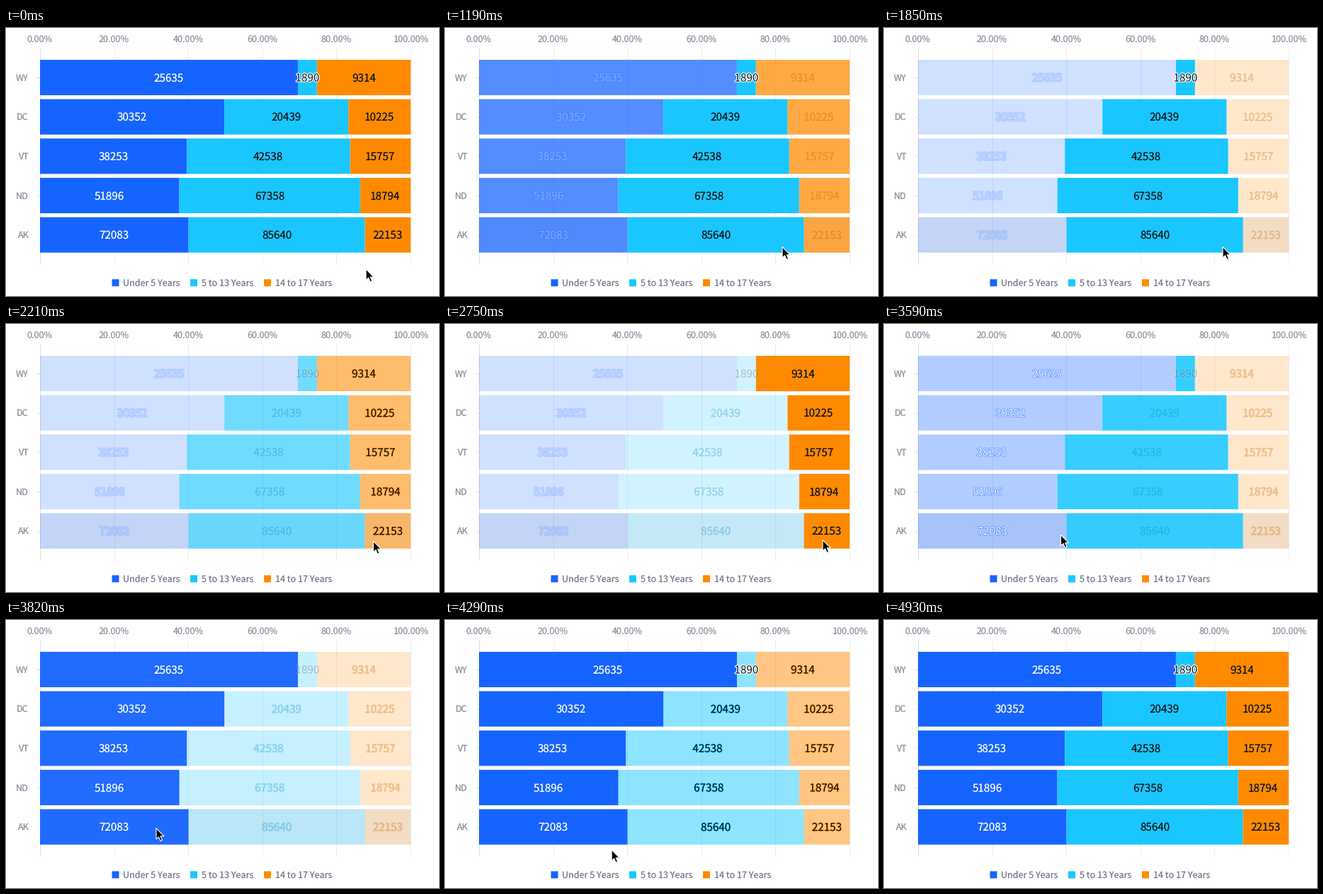
Animation, 611 px wide and 379 px high, one loop 5.59 s. Source, as a matplotlib script:

```python
import matplotlib.pyplot as plt
import numpy as np
from matplotlib.animation import FuncAnimation
from matplotlib.patches import Polygon, Rectangle
from matplotlib.patheffects import Normal, Stroke

W, H, DPI = 611, 379, 100
LOOP, INTERVAL = 5590, 26
PT = 72 / DPI  # points per pixel
plt.rcParams["font.family"] = "Noto Sans CJK JP"
plt.rcParams["text.hinting"] = "none"

SERIES = ["Under 5 Years", "5 to 13 Years", "14 to 17 Years"]
COLORS = ["#1664ff", "#1ac6ff", "#ff8a00"]
MUTED_INK = [(1, 1, 1), (.05, .39, .5), (.5, .27, 0)]
INK = ["#ffffff", "#0c1218", "#0c1218"]
DATA = {
    "WY": (25635, 1890, 9314),
    "DC": (30352, 20439, 10225),
    "VT": (38253, 42538, 15757),
    "ND": (51896, 67358, 18794),
    "AK": (72083, 85640, 22153),
}
LEFT, RIGHT, TOP, BOTTOM = 48, 571, 28.3, 334.3
STEP = (BOTTOM - TOP) / 5.5
BAR = 0.9 * STEP

# Screen-capture clock: (ms, tick) anchors
CLOCK_MS = [0, 660, 1190, 3350, 3820, 4000, 4520, 4930, 5590]
CLOCK_TICK = [0, 11, 20, 56, 64, 67, 76, 83, 94]

# (ms, hovered series)
HOVERS = [(1090, 1), (2070, 2), (2966, 1), (3538, 0), (4180, None)]
FADE, DIM = 300, 0.2
CURSOR_GONE = 4900
PATH = np.array([
    (0, 508, 341), (660, 508, 341), (900, 500, 333), (1090, 485, 318),
    (1190, 476, 309.5), (1250, 478, 309.5), (1850, 478, 309.5),
    (2070, 507, 308.5), (2390, 533, 305.5), (2750, 533, 305.5),
    (2966, 507, 305), (3170, 393, 301), (3538, 257, 299), (3820, 212, 294.5),
    (3880, 211, 294.5), (4000, 211, 294.5), (4180, 222, 318),
    (4520, 263, 340), (4640, 360, 352), (4870, 584, 375),
])
ARROW = np.array([(0, 0), (0, 15.4), (3.5, 12.2), (6, 18),
                  (8.5, 16.9), (6.1, 11.2), (10.9, 11.2)])

fig = plt.figure(figsize=(W / DPI, H / DPI), dpi=DPI, facecolor="white")
ax = fig.add_axes([0, 0, 1, 1])
ax.set_xlim(0, W)
ax.set_ylim(H, 0)
ax.axis("off")


def line(x0, y0, x1, y1, color):
    ax.plot([x0, x1], [y0, y1], color=color, lw=PT, zorder=0,
            solid_capstyle="butt")


def rect(x, y, w, h, color, z=2, **kw):
    return ax.add_patch(Rectangle((x, y), w, h, fc=color, lw=0, zorder=z,
                                  snap=False, **kw))


def text(x, yc, s, size, color, ha="center", z=4):
    return ax.text(x, yc + 0.366 * size, s, fontsize=size * PT, color=color,
                   ha=ha, va="baseline", zorder=z)


def outline(color, px):
    return [Stroke(linewidth=px * PT, foreground=color, joinstyle="round"),
            Normal()]


def draw_axes():
    for i in range(6):
        x = LEFT + (RIGHT - LEFT) * i / 5
        line(x, TOP, x, BOTTOM, "#d9dde4" if i == 0 else "#ebedf2")
        text(x, 15, f"{20 * i:.2f}%", 12.6, "#89909d")
    for i, name in enumerate(DATA):
        yc = row_top(i) + BAR / 2
        line(LEFT - 4, yc, LEFT, yc, "#d9dde4")
        text(32, yc, name, 12.6, "#89909d", "right")


def draw_legend():
    for x, name, color in zip((149.5, 260, 364), SERIES, COLORS):
        rect(x, 355.3, 10, 10, color)
        text(x + 15.5, 360.3, name, 12.6, "#6f7688", "left")


def row_top(i):
    return TOP + STEP * (0.3 + i)


def draw_bars():
    bars, labels = [[], [], []], [[], [], []]
    for i, row in enumerate(DATA.values()):
        edges = LEFT + (RIGHT - LEFT) * np.cumsum((0,) + row) / sum(row)
        for s, value in enumerate(row):
            x0, x1 = edges[s], edges[s + 1]
            bars[s].append(rect(x0, row_top(i), x1 - x0, BAR, COLORS[s]))
            label = text((x0 + x1) / 2, row_top(i) + BAR / 2, str(value),
                         15.2, INK[s])
            label.overflows = x1 - x0 < 30
            labels[s].append(label)
    return bars, labels


draw_axes()
draw_legend()
bars, labels = draw_bars()
band = rect(LEFT, row_top(4), RIGHT - LEFT, BAR, "#b2bacf", z=1, alpha=0.2)
cursor = ax.add_patch(Polygon(ARROW, fc="black", ec="white", lw=1.1 * PT,
                              joinstyle="round", zorder=9))


def tick_time(ms):
    tick = np.floor(np.interp(ms, CLOCK_MS, CLOCK_TICK) + 1e-6)
    return np.interp(tick, CLOCK_TICK, CLOCK_MS)


def hover_state(t):
    """Hovered series and the eased opacity of every series."""
    active, opacity = None, np.ones(3)
    for start, hovered in HOVERS:
        if t < start:
            break
        active = hovered
        goal = np.array([1 if hovered in (None, s) else DIM
                         for s in range(3)])
        opacity = opacity + (goal - opacity) * min((t - start) / FADE, 1)
    return active, opacity


def style_label(label, s, active, opacity):
    dimmed = active not in (None, s)
    halo = "white" if label.overflows else COLORS[s]
    if dimmed:
        label.set_color("black" if label.overflows else MUTED_INK[s])
        label.set_alpha(0.2 if s == 0 else 0.13)
        width = 2.2 if 0 in (s, active) else 1
    else:
        label.set_color(INK[s])
        label.set_alpha(1)
        width = 1 if opacity < 0.9 else 0
    if label.overflows:
        width = 2.4
    label.set_path_effects(outline(halo, width) if width else [])


def update(i):
    t = tick_time(i * INTERVAL + INTERVAL - 1)
    active, opacity = hover_state(t)
    for s in range(3):
        for bar, label in zip(bars[s], labels[s]):
            bar.set_alpha(opacity[s])
            style_label(label, s, active, opacity[s])
    band.set_visible(active is not None)
    tip = [np.interp(t, PATH[:, 0], PATH[:, k]) for k in (1, 2)]
    cursor.set_xy(ARROW + tip)
    cursor.set_visible(bool(t < CURSOR_GONE))
    return []


anim = FuncAnimation(fig, update, frames=LOOP // INTERVAL, interval=INTERVAL,
                     repeat=True, repeat_delay=0, blit=False)
plt.show()
```
